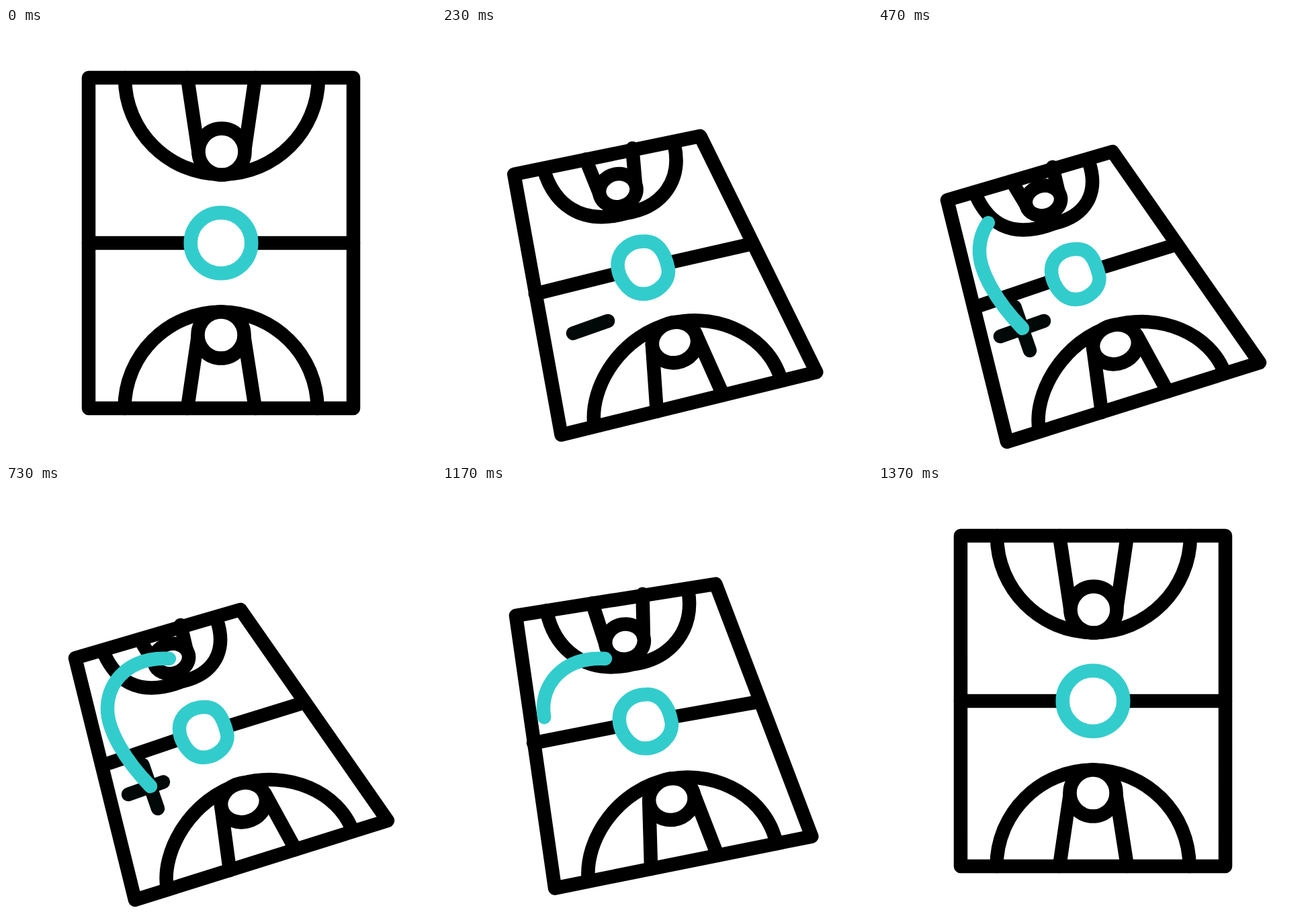
Recreate the animation shown at these times as an HTML page. Size 640 by 640 pixels, loop 1.67 s.

```html
<!DOCTYPE html>
<html>
<head>
<meta charset="utf-8">
<style>
  html, body { margin: 0; height: 100%; overflow: hidden; background: #fff; }
  svg { display: block; width: 100vw; height: 100vh; }
  path { fill: none; stroke: #000; stroke-width: 20.5; stroke-linecap: round; stroke-linejoin: round; }
  .hole { fill: #fff; }
  .cross { stroke: #010808; }
  .teal { stroke: #3cc; }
</style>
</head>
<body>
<svg viewBox="0 0 640 640"></svg>
<script>
const LOOP = 1670, FRAME = 100 / 3;
const svg = document.querySelector('svg');

function addPath(cls, d = '') {
  const el = document.createElementNS('http://www.w3.org/2000/svg', 'path');
  el.setAttribute('class', cls);
  el.setAttribute('d', d);
  svg.append(el);
  return el;
}

// Closed curve around (cx, cy) with half axes u and v, starting at the top.
function ring(cx, cy, ux, uy, vx, vy) {
  const at = (a, b) => `${cx + a * ux + b * vx} ${cy + a * uy + b * vy} `;
  const k = 0.5523;
  return 'M' + at(0, -1) +
    'C' + at(k, -1) + at(1, -k) + at(1, 0) +
    'C' + at(1, k) + at(k, 1) + at(0, 1) +
    'C' + at(-k, 1) + at(-1, k) + at(-1, 0) +
    'C' + at(-1, -k) + at(-k, -1) + at(0, -1) + 'Z';
}

// Court parts: class, flat outline, tilted outline.
const court = [
  ['', 'M123 74L517 74L517 566L123 566Z', 'M103 256L349 184L568 498L192 616Z'],
  ['', 'M123 320L275 320', 'M143 416L255 378'],
  ['', 'M365 320L517 320', 'M335 356L445 322'],
  // upper half
  ['', 'M177 74C177 153.5 241.5 218 321 218C400.5 218 465 153.5 465 74',
       'M144 245C162 288 195 316 262 291C310 280 329 245 314 200'],
  ['', 'M270 74L287 188', 'M199 228L222 266'],
  ['', 'M371 74L354.5 187', 'M260 207L271 254'],
  ['hole', ring(321, 184, 34.5, 0, 0, 34.5), ring(246, 257, 25.3, -7.7, 6.4, 21)],
  // lower half
  ['', 'M176.5 566C176.5 487 241 422.5 320 422.5C399 422.5 463.5 487 463.5 566',
       'M240 600C230 545 275 465 350 443C420 423 495 455 516 514'],
  ['', 'M286 457L270 566', 'M320 475L333 572'],
  ['', 'M354 457L371 566', 'M385 457L431 541'],
  ['hole', ring(320, 457, 34.5, 0, 0, 34.5), ring(353.5, 471, 33, -7, 5, 28.5)],
  // centre circle
  ['hole teal', ring(320, 320, 45.3, 0, 0, 45.3),
    'M295 329C314 328 323 344 329 368C333 386 314 404 293 404' +
    'C272 404 258 378 258 361C258 343 274 329 295 329Z'],
].map(([cls, flat, tilted]) => ({ el: addPath(cls), flat, tilted: tilted.match(/[\d.]+/g) }));

// Drawn strokes: class, path, frames of drawing on and wiping off.
const strokes = [
  ['cross', 'M247 436L182 459', 3, 8, 21, 26],
  ['cross', 'M203.5 415L226 480', 7, 11, 25, 30],
  ['teal', 'M215 447C177 408 150 362 151 330C152 290 184 254 243 257', 10, 16, 30, 41],
].map(([cls, d, ...times]) => {
  const el = addPath(cls, d);
  el.setAttribute('pathLength', 1);
  return { el, times };
});

const ramp = (f, a, b) => Math.min(1, Math.max(0, (f - a) / (b - a)));

// Cubic ease with handles (.6, 0) and (.4, 1), solved by bisection.
function ease(x) {
  let lo = 0, hi = 1, s;
  for (let i = 0; i < 24; i++) {
    s = (lo + hi) / 2;
    const xs = 1.8 * s * (1 - s) ** 2 + 1.2 * s * s * (1 - s) + s ** 3;
    if (xs < x) lo = s; else hi = s;
  }
  return s * s * (3 - 2 * s);
}

function draw(f) {
  const tilt = ease(Math.min(ramp(f, 0, 11), ramp(f, 41.2, 30.2)));
  for (const { el, flat, tilted } of court) {
    let i = 0;
    el.setAttribute('d', flat.replace(/[\d.]+/g, n => +n + (tilted[i++] - n) * tilt));
  }
  for (const { el, times: [on, full, off, gone] } of strokes) {
    const start = ramp(f, off, gone), end = ramp(f, on, full);
    el.style.display = end - start > 0.001 ? '' : 'none';
    el.style.strokeDasharray = `${end - start} 3`;
    el.style.strokeDashoffset = -start;
  }
}

// The motion runs in steps of 30 per second.
function tick() {
  draw(Math.floor((performance.now() % LOOP + 4) / FRAME));
  requestAnimationFrame(tick);
}
tick();
</script>
</body>
</html>
```
